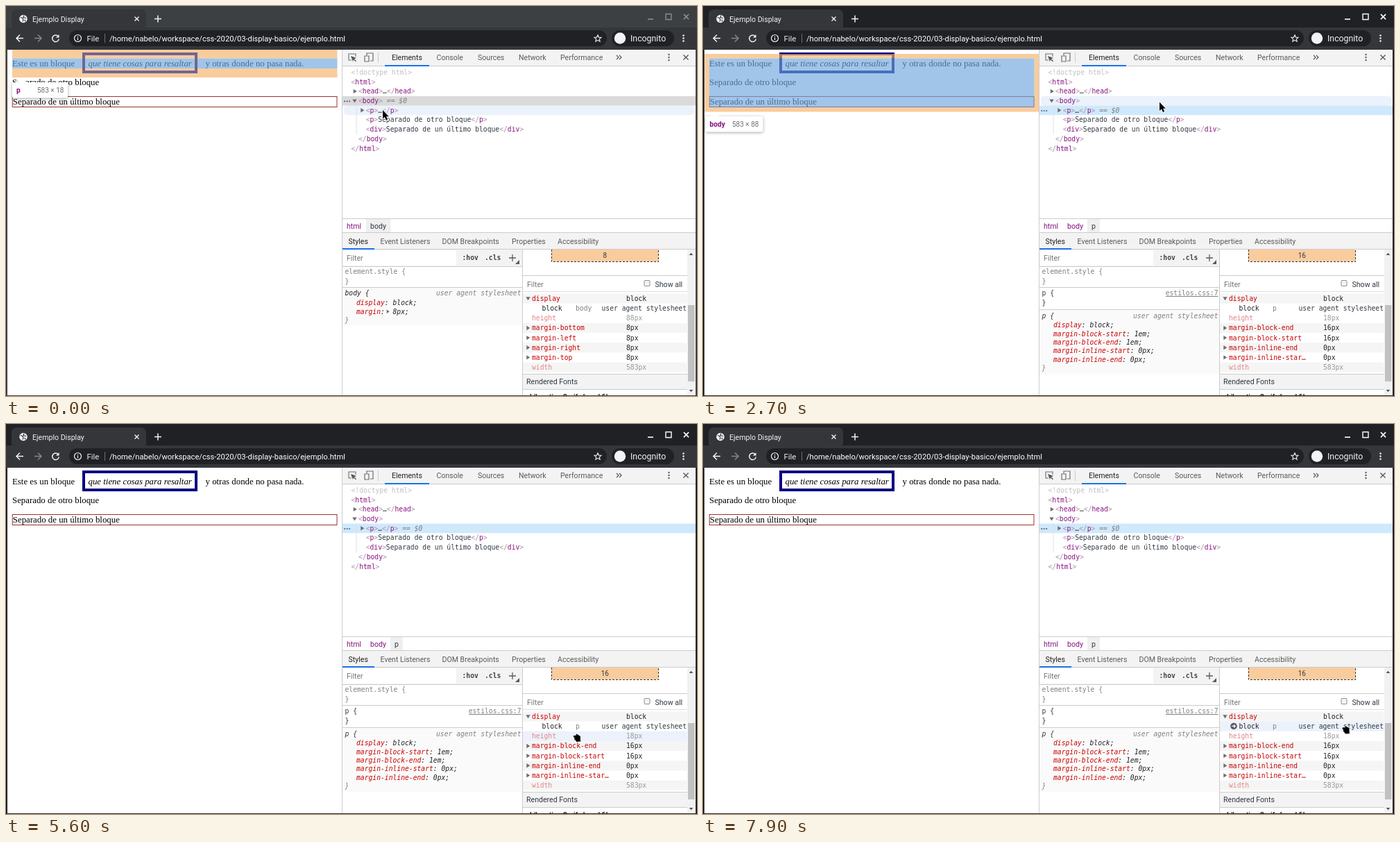
These frames come from a looping animation (996x562 px, 8000 ms). An HTML page with a canvas:

```html
<!DOCTYPE html>
<html lang="es">
<head>
<meta charset="utf-8">
<title>Ejemplo Display</title>
<style>
html, body { margin: 0; width: 100%; height: 100%; overflow: hidden; background: #fff; }
canvas { display: block; }
</style>
</head>
<body>
<canvas id="stage" width="996" height="562"></canvas>
<script>
const c = document.getElementById('stage').getContext('2d');
const LOOP = 8000, STEP = 100;
const UI = '10.6px Roboto, sans-serif';
const MONO = '9.7px "DejaVu Sans Mono", monospace';
const ITALIC = 'italic ' + MONO;
const SERIF = '12.85px "Liberation Serif", serif';
const INK = '#303942', RED = '#c80000', PURPLE = '#881280', GREY = '#808080', BLUE = '#1a73e8';
const MARGIN = 'rgba(246,178,107,.66)', CONTENT = 'rgba(111,168,220,.66)';

// Pointer path: time, x, y
const PATH = [
  [0, 543, 150], [2000, 543, 150], [2100, 544, 150], [2300, 544, 150],
  [2400, 588, 143.6], [2600, 588, 143.6], [2700, 658, 138.5], [2800, 642, 139],
  [2900, 600, 146], [3000, 570, 150], [3600, 570, 150], [3700, 572, 215],
  [4000, 581, 400], [4100, 585, 448], [4200, 585, 448], [4300, 585, 453],
  [4400, 585, 459], [4700, 585, 459], [4800, 586, 459], [4900, 640, 456],
  [5000, 735, 450], [5100, 822, 457.5], [5400, 822, 457.5], [5700, 821, 441],
  [6000, 822, 427], [6300, 915, 424], [6400, 922, 425], [6700, 922, 425],
  [7200, 845, 441], [7600, 811, 434], [7900, 925, 435], [8000, 925, 435]
];

function pointer(t) {
  const i = PATH.findIndex((k, n) => n && t <= k[0]);
  const a = PATH[i - 1], b = PATH[i], u = (t - a[0]) / (b[0] - a[0]);
  return { x: a[1] + (b[1] - a[1]) * u, y: a[2] + (b[2] - a[2]) * u };
}

function box(x, y, w, h, color) { c.fillStyle = color; c.fillRect(x, y, w, h); }

function frame(x, y, w, h, line, color) {
  c.lineWidth = line;
  c.strokeStyle = color;
  c.strokeRect(x + line / 2, y + line / 2, w - line, h - line);
}

function text(s, x, y, color = INK, font = UI, align = 'left') {
  c.font = font;
  c.fillStyle = color;
  c.textAlign = align;
  c.fillText(s, x, y);
  return x + c.measureText(s).width;
}

function round(x, y, w, h, r, color) {
  c.beginPath();
  c.roundRect(x, y, w, h, r);
  c.fillStyle = color;
  c.fill();
}

function disc(x, y, r, color) {
  c.beginPath();
  c.arc(x, y, r, 0, 7);
  c.fillStyle = color;
  c.fill();
}

function trace(d, x, y, color, width = 1.3) {
  c.save();
  c.translate(x, y);
  c.strokeStyle = color;
  c.lineWidth = width;
  c.stroke(new Path2D(d));
  c.restore();
}

function shape(d, x, y, color, outline) {
  c.save();
  c.translate(x, y);
  const p = new Path2D(d);
  if (outline) { c.strokeStyle = outline; c.lineWidth = 1.4; c.lineJoin = 'round'; c.stroke(p); }
  c.fillStyle = color;
  c.fill(p);
  c.restore();
}

function twisty(x, y, open) {
  shape(open ? 'M-3.2-2.2H3.2L0 2.8Z' : 'M-2.2-3.2V3.2L2.8 0Z', x, y, '#6e6e6e');
}

function cross(x, y, r, color, w) { trace(`M${-r} ${-r}L${r} ${r}M${r} ${-r}L${-r} ${r}`, x, y, color, w); }

function dots(x, y, gap, r, color, across) {
  for (let i = -1; i < 2; i++) disc(x + (across ? i * gap : 0), y + (across ? 0 : i * gap), r, color);
}

// Markup with coloured brackets and tag names
function markup(s, x, y) {
  let inside = false;
  for (const part of s.split(/(<\/?|>)/)) {
    const bracket = /^[<>]/.test(part);
    if (bracket) inside = part !== '>';
    x = text(part, x, y, bracket ? '#a894a6' : inside ? PURPLE : INK, MONO);
  }
  return x;
}

function rule(name, value, y) {
  text(': ' + value + ';', text(name, 505, y, RED, ITALIC), y, '#222', ITALIC);
}

function browser(active) {
  const edge = active ? '#202124' : '#3c4043', light = '#f1f3f4';
  box(0, 0, 996, 562, edge);
  round(8, 5, 194, 30, 7, '#35363a');
  box(0, 31, 996, 32, '#35363a');
  box(0, 63, 2, 499, edge);
  disc(25, 18.5, 5.7, light);
  trace('M-4-2L-1-1L0 2L-1 4M1-5L0-2L4-1M3 4L2 1', 25, 18.5, '#35363a', 1.2);
  text('Ejemplo Display', 38, 22.5, light);
  cross(188.5, 18.5, 3, light, 1.4);
  trace('M-5 0H5M0-5V5', 219, 18.5, light, 1.5);
  const btn = active ? '#fff' : '#888b8f';
  trace('M-4 0H4', 929, 19, btn, 1.6);
  trace('M-4-4H4V4H-4Z', 955, 15.5, btn, 1.4);
  cross(980.5, 15.5, 3.6, btn, 1.6);

  trace('M5 0H-5M0-5L-5 0L0 5', 20, 46.5, light, 1.5);
  trace('M-5 0H5M0-5L5 0L0 5', 46, 46.5, '#85878a', 1.5);
  trace('M3.6-3A4.8 4.8 0 1 0 4.8 1', 71.5, 46.5, light, 1.5);
  shape('M5-5.5V-1H.5Z', 71.5, 46.5, light);
  round(91, 35, 775, 23, 11.5, '#202124');
  trace('M5 0A5 5 0 1 1-5 0A5 5 0 1 1 5 0M0-.7V2.8M0-2.8V-1.6', 103.5, 46.5, light, 1.2);
  text('File', 116.5, 50.5, '#e8eaed', '11.4px Roboto, sans-serif');
  box(142, 40, 1, 13, '#6b6e72');
  text('/home/nabelo/workspace/css-2020/03-display-basico/ejemplo.html', 149, 50.5, '#fff', '11.15px Roboto, sans-serif');
  trace('M0-5L1.5-1.7L5-1.5L2.3.9L3.1 4.4L0 2.5L-3.1 4.4L-2.3.9L-5-1.5L-1.5-1.7Z', 853, 46.8, light, 1.1);
  round(873, 35, 90, 23, 11.5, '#202124');
  disc(885, 46.5, 8.2, light);
  text('Incognito', 900, 50.8, light, '12.3px Roboto, sans-serif');
  dots(976.5, 46.5, 4, 1.3, light);
}

function tipBox(x, y, w, name, size, sizeX) {
  c.save();
  c.shadowColor = 'rgba(0,0,0,.35)';
  c.shadowBlur = 4;
  c.shadowOffsetY = 1;
  round(x, y, w, 22.5, 2, '#fff');
  c.restore();
  shape('M-6.5 0L0-7L6.5 0Z', x + 13.5, y + .5, '#fff');
  text(name, x + 6, y + 15, PURPLE, 'bold 10.2px Roboto, sans-serif');
  text(size, sizeX, y + 15, '#6b6f75', '10px Roboto, sans-serif');
}

function page(over) {
  box(2, 63, 482, 498, '#fff');
  text('Este es un bloque', 9, 87, '#000', SERIF);
  frame(110, 67, 166, 30, 4, '#000080');
  text('que tiene cosas para resaltar', 118.5, 87, '#000', 'italic ' + SERIF);
  text('y otras donde no pasa nada.', 287.5, 87, '#000', SERIF);
  text('Separado de otro bloque', 9, 114.3, '#000', SERIF);
  frame(8.8, 130, 468.6, 16, .8, '#800000');
  text('Separado de un último bloque', 9.8, 142.3, '#000', SERIF);
  if (over === 'p') {
    box(9, 63, 468.5, 12.5, MARGIN);
    box(9, 75.5, 468.5, 14.5, CONTENT);
    box(9, 90, 468.5, 13, MARGIN);
    frame(110, 67, 166, 30, 4, '#74648f');
    tipBox(9, 110, 80, 'p', '583 × 18', 45);
  } else if (over === 'body') {
    box(2.5, 69, 481.5, 6.5, MARGIN);
    box(2.5, 75.5, 6.5, 70.5, MARGIN);
    box(477.5, 75.5, 6.5, 70.5, MARGIN);
    box(2.5, 146, 481.5, 6.5, MARGIN);
    box(9, 75.5, 468.5, 70.5, CONTENT);
    tipBox(3.5, 159, 83, 'body', '583 × 88', 42);
  }
}

function tools() {
  box(484, 63, 510, 498, '#fff');
  box(485, 63, 509, 23, '#f3f3f3');
  box(485, 86, 509, 1, '#ccc');
  box(484, 63, 1, 498, '#ccc');
  trace('M-1 4H-5V-5H5V-1', 499, 74, '#6e6e6e', 1.1);
  shape('M-2-2L6 1L3 2.3L6 5.3L5 6.2L2 3.2L1 6Z', 499, 74, '#555');
  trace('M-3-3V-6H6V5H2M-6-2H0V6H-6Z', 523, 74, '#6e6e6e', 1.2);
  box(536, 67, 1, 15, '#ccc');
  const tabs = { Elements: 556, Console: 620.5, Sources: 680, Network: 739, Performance: 799 };
  for (const name in tabs) text(name, tabs[name], 78, name === 'Elements' ? '#222' : '#5a5a5a');
  trace('M-4-3L-1 0L-4 3M0-3L3 0L0 3', 884, 74, '#555', 1.2);
  box(546, 85, 64, 2, BLUE);
  dots(955.5, 74, 4, 1.2, '#5a5a5a');
  cross(980, 74, 3.6, '#5a5a5a', 1.4);
}

const rowY = i => 95.5 + 13.7 * i;

function tree(selected, over) {
  const current = selected ? 4 : 3, hover = over === 'p' ? 4 : over === 'body' ? 3 : -1;
  const top = i => rowY(i) - 6.8;
  if (hover >= 0 && hover !== current) round(487, top(hover), 505, 13.7, 5, '#ebf2fc');
  box(485, top(current), 509, 13.7, selected ? '#cfe8fc' : '#dadada');
  box(504.5, 143, 1, 42, '#dce3ec');
  const base = i => rowY(i) + 3.4;
  text('<!doctype html>', 497.5, base(0), '#c0c0c0', MONO);
  const rows = [['<html>', 497.5], ['<head>…</head>', 508], ['<body>', 508], ['<p>…</p>', 518.7],
    ['<p>Separado de otro bloque</p>', 518.7], ['<div>Separado de un último bloque</div>', 518.7],
    ['</body>', 508], ['</html>', 497.5]];
  rows.forEach(([s, x], i) => {
    const end = markup(s, x, base(i + 1));
    if (i + 1 === current) text(' == $0', end, base(i + 1), GREY, ITALIC);
  });
  twisty(503, rowY(2));
  twisty(502.5, rowY(3), true);
  twisty(513.5, rowY(4));
  dots(491.7, rowY(current) + .7, 3.5, 1.1, '#5a6470', true);
}

function sidebarTop(selected) {
  box(485, 306, 509, 1, '#ccc');
  if (selected) box(554, 307, 18, 19, '#efefef'); else box(519, 307, 35.5, 19, '#efefef');
  text('html', 491, 320.5, PURPLE);
  text('body', 525, 320.5, selected ? PURPLE : INK);
  if (selected) text('p', 560, 320.5);
  box(485, 326, 509, 25, '#f3f3f3');
  box(485, 326, 509, 1, '#ccc');
  box(485, 350, 509, 1, '#ccc');
  const tabs = { Styles: 493.5, 'Event Listeners': 539.5, 'DOM Breakpoints': 628.5, Properties: 729, Accessibility: 795 };
  for (const name in tabs) text(name, tabs[name], 343, name === 'Styles' ? '#222' : '#5a5a5a');
  box(485, 349, 46, 2, BLUE);
}

function styles(selected) {
  box(485, 351, 259, 24, '#f3f3f3');
  box(486, 352, 163, 22, '#fff');
  box(485, 375, 259, 1, '#ccc');
  text('Filter', 491, 366.5, '#757575');
  text(':hov', 657.5, 365.5, '#444', 'bold ' + MONO);
  text('.cls', 690, 365.5, '#444', 'bold ' + MONO);
  trace('M-5 0H5M0-5V5', 730, 363, '#5a5a5a', 1.3);
  shape('M3-3V3H-3Z', 737, 369, '#5a5a5a');
  text('element.style {', 488.5, 385.5, GREY, MONO);
  text('}', 488.5, 400, GREY, MONO);
  box(485, 405, 259, 1, '#ccc');
  const agent = y => text('user agent stylesheet', 742.5, y, GREY, ITALIC, 'right');
  if (!selected) {
    box(485, 406, 259, 54, '#fafafa');
    text('body {', 488.5, 417, '#222', ITALIC);
    agent(417);
    rule('display', 'block', 431.3);
    text(':', text('margin', 505, 443.6, RED, ITALIC), 443.6, '#222', ITALIC);
    shape('M-1.8-2.7V2.7L2.2 0Z', 550.5, 440.3, '#6e6e6e');
    text('8px;', 557.5, 443.6, '#222', ITALIC);
    text('}', 488.5, 456.3, GREY, ITALIC);
    return;
  }
  text('p {', 488.5, 417, INK, MONO);
  text('estilos.css:7', 742.5, 417, GREY, MONO, 'right');
  box(667, 418, 75.5, 1, GREY);
  text('}', 488.5, 431, INK, MONO);
  box(485, 437, 259, 1, '#ccc');
  box(485, 438, 259, 92, '#fafafa');
  text('p {', 488.5, 449.5, INK, ITALIC);
  agent(449.5);
  const rules = [['display', 'block'], ['margin-block-start', '1em'], ['margin-block-end', '1em'],
    ['margin-inline-start', '0px'], ['margin-inline-end', '0px']];
  rules.forEach(([k, v], i) => rule(k, v, 463.1 + 12.4 * i));
  text('}', 488.5, 524.5, GREY, ITALIC);
}

const ROW = 14.15, ROWS_TOP = 414.5;

function goIcon(x, y) {
  disc(x, y, 4.8, '#5a5a5a');
  trace('M-2.8 0H2M0-2.2L2.2 0L0 2.2', x, y, '#fff', 1.2);
}

function computed(selected, hover) {
  box(744, 351, 1, 210, '#ccc');
  box(786, 351, 154.5, 17, '#f9cc9d');
  c.save();
  c.setLineDash([3, 2]);
  trace('M0 0V17.5H154V0', 786.5, 351, '#333', 1);
  c.restore();
  text(selected ? '16' : '8', 863.3, 362.5, INK, '10px Roboto, sans-serif', 'center');
  box(745, 388, 237, 1, '#ccc');
  text('Filter', 751, 405, '#757575');
  round(919.5, 395, 9, 9, 2, '#909090');
  round(920.5, 396, 7, 7, 1, '#f4f4f4');
  text('Show all', 935.5, 405);
  box(745, 411, 237, 1, '#e0e0e0');

  const rows = selected
    ? [['margin-block-end', '16px'], ['margin-block-start', '16px'], ['margin-inline-end', '0px'], ['margin-inline-star…', '0px']]
    : ['bottom', 'left', 'right', 'top'].map(side => ['margin-' + side, '8px']);
  const list = [['display', 'block'], null, ['height', selected ? '18px' : '88px'], ...rows, ['width', '583px']];
  list.forEach((row, i) => {
    const top = ROWS_TOP + ROW * i, y = top + 10.4, faint = i === 2 || i === 7;
    const shade = i === 0 || i > 2 && i % 2;
    if (i === hover) box(745, top, 236.5, ROW, '#ebf2fc');
    else if (shade) box(745, top, 236.5, ROW, '#f5f5f5');
    if (!row) {
      text('block', 772.5, y, '#222', MONO);
      text(selected ? 'p' : 'body', 821, y, GREY, MONO);
      text('user agent stylesheet', 981, y, INK, MONO, 'right');
      if (i === hover) goIcon(765, top + 6.8);
      return;
    }
    text(row[0], 758, y, faint ? '#e38585' : RED, MONO);
    text(row[1], 894, y, faint ? '#999' : '#222', MONO);
    if (!faint) twisty(752.5, top + 7, i === 0);
    if (i === hover && i === 0) goIcon(886, top + 6.5);
  });

  box(745, 530, 237, 23, '#f3f3f3');
  box(745, 530, 237, 1, '#ccc');
  box(745, 552, 237, 1, '#ccc');
  text('Rendered Fonts', 750, 545.3);
  text('Liberation Serif—Local file', 755, 567, '#222', 'bold 10px Roboto, sans-serif');
  box(982, 351, 12, 210, '#f1f1f1');
  box(983, 431, 9.5, 110, '#c1c1c1');
  shape('M-2.8 1.5H2.8L0-1.8Z', 987.5, 357.5, '#505050');
  shape('M-2.8-1.5H2.8L0 1.8Z', 987.5, 554.5, '#505050');
}

function cursor(p, hand) {
  if (hand) {
    shape('M-3.5 3.4Q-3.5 2.2-2 2.2H1L0 .9Q.5-.4 2 .5L6.6 3.4V8L7 11L1 11.6L-1 8.7L-2.6 7.6L-1.4 6.4L-3 5Z', p.x, p.y, '#000', '#fff');
  } else if (p.x < 744 && p.y > 410) {
    const d = 'M-3-6.5Q0-6.5 0-5V5Q0 6.5-3 6.5M3-6.5Q0-6.5 0-5M0 5Q0 6.5 3 6.5';
    trace(d, p.x, p.y, '#fff', 2.4);
    trace(d, p.x, p.y, '#111', 1.2);
  } else {
    shape('M0 0V12.5L2.8 10L5 14.6L7.2 13.6L5.1 9.2H8.8Z', p.x, p.y, '#000', '#fff');
  }
}

function hint() {
  round(602.5, 158.5, 228.5, 22, 3, '#a8a8a8');
  round(603.5, 159.5, 226.5, 20, 2, '#f0f0f0');
  text('Use $0 in the console to refer to this element.', 610, 173);
}

function draw(t) {
  const selected = t >= 500, p = pointer(t);
  const line = p.x > 485 && p.y < 157.1 ? Math.round((p.y - 95.5) / 13.7) : -1;
  const over = line === 4 ? 'p' : line === 3 ? 'body' : '';
  const row = p.x > 745 ? Math.floor((p.y - ROWS_TOP) / ROW) : -1;
  const edge = selected ? '#202124' : '#3c4043';
  browser(selected);
  page(over);
  tools();
  tree(selected, over);
  sidebarTop(selected);
  styles(selected);
  computed(selected, row);
  box(0, 561, 996, 1, edge);
  box(994, 63, 2, 499, edge);
  if (t >= 3600 && t < 3700) hint();
  cursor(p, row >= 0);
}

const start = performance.now();
function loop() {
  const t = (performance.now() - start) % LOOP;
  draw(Math.floor(t / STEP) * STEP);
  requestAnimationFrame(loop);
}
loop();
</script>
</body>
</html>
```
